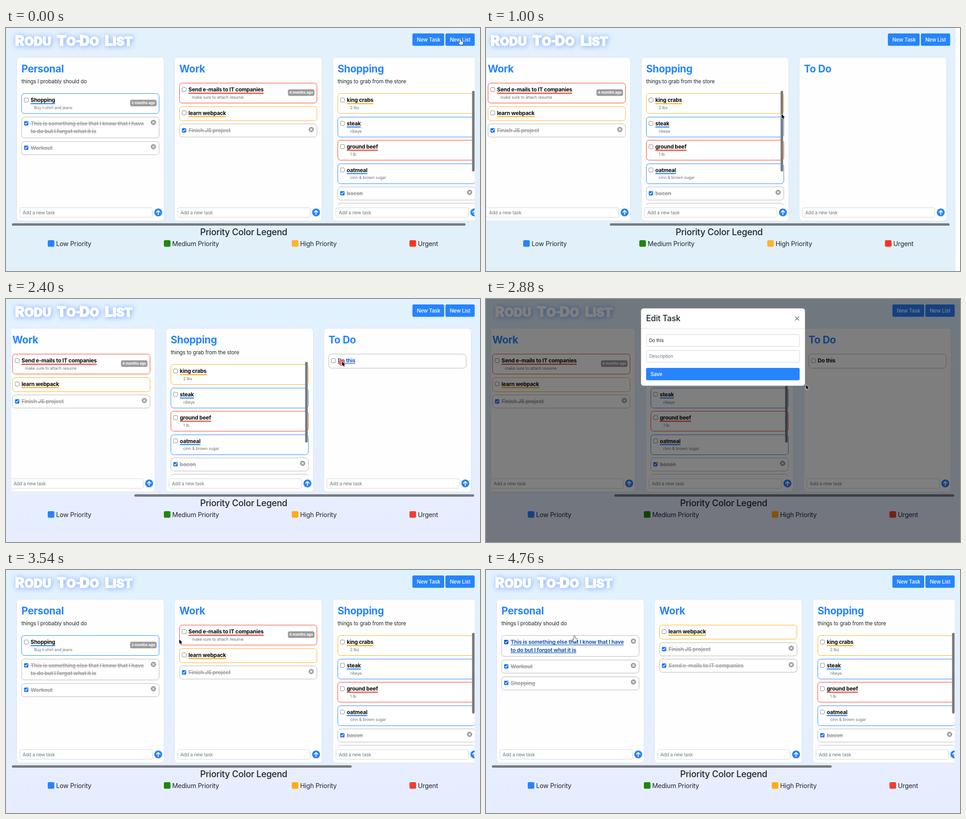
Write an HTML page with a canvas that moves like this. It is 1045 px wide and 536 px high and loops after 4.78 s.

```html
<!DOCTYPE html>
<html lang="en">
<head>
<meta charset="utf-8">
<title>To-do board</title>
<style>
html, body { margin: 0; width: 100%; height: 100%; overflow: hidden; background: #fff; }
canvas { display: block; }
</style>
</head>
<body>
<canvas id="stage" width="1045" height="536"></canvas>
<script>
const ctx = document.getElementById('stage').getContext('2d');
const LOOP = 4780, STEP = 20, W = 1045, H = 536;
const LIST_ADDED = 660, TASK_ADDED = 1760, RECOLOR = 2180, WORK_DONE = 3900, PERSONAL_DONE = 4450;
const BLUE = '#2684ff', LINK = '#1a5cb8', GRAY = '#a3a3a3', INK = '#212529';

// [time, value...] keys
const cursorKeys = [
  [0, 1002, 25], [80, 1002, 25], [230, 480, 91], [420, 480, 91], [560, 461, 164], [650, 461, 164],
  [720, 509, 178], [1000, 652, 190], [1080, 740, 405], [1480, 760, 420], [1640, 1000, 410],
  [1690, 1013, 405], [1780, 1013, 405], [2010, 655, 200], [2340, 741, 138],
  [2460, 741, 138], [3180, 684, 220], [3280, 674, 212], [3540, 382, 153],
  [3740, 393, 136], [3900, 393, 136], [4310, 62, 159], [4380, 45, 158],
  [4470, 45, 158], [4740, 195, 146]];
const scrollKeys = [[760, 0], [950, 368], [3264, 368], [3470, 0]];
const shiftKeys = [[920, 0], [970, -10], [1010, -10], [1070, 0], [3450, 0], [3490, 8], [3540, 0]];
const clicks = [[620, 461, 166], [1690, 1013, 407], [2340, 740, 140], [3840, 393, 136], [4390, 45, 159]];
const handTimes = [[0, 180], [540, 660], [1670, 1800], [4620, LOOP]];
const dialogs = [
  { keys: [[60, 0], [120, 1], [600, 1], [650, 0]], heading: 'New List', value: 'To Do', typeAt: 240, action: 'Add List' },
  { keys: [[2430, 0], [2490, 1], [3150, 1], [3210, 0]], heading: 'Edit Task', value: 'Do this', typeAt: 0, action: 'Save' }];

const within = (t, a, b) => t >= a && t < b;
const typing = (str, t, start) => str.slice(0, Math.max(0, Math.floor((t - start) / 60)));

function sample(keys, t) {
  const next = keys.findIndex(k => k[0] > t);
  if (next < 0) return keys[keys.length - 1].slice(1);
  if (next === 0) return keys[0].slice(1);
  const a = keys[next - 1], b = keys[next];
  const p = (t - a[0]) / (b[0] - a[0]), e = p * p * (3 - 2 * p);
  return a.slice(1).map((v, i) => v + (b[i + 1] - v) * e);
}

function text(str, x, y, size, color, weight = 400) {
  ctx.font = `${weight} ${size}px Inter, sans-serif`;
  ctx.letterSpacing = `${-0.015 * size}px`;
  ctx.fillStyle = color;
  ctx.fillText(str, x, y);
  return ctx.measureText(str).width;
}

function box(x, y, w, h, r, fill, stroke) {
  ctx.beginPath();
  ctx.roundRect(x, y, w, h, r);
  if (fill) { ctx.fillStyle = fill; ctx.fill(); }
  if (stroke) { ctx.strokeStyle = stroke; ctx.lineWidth = 1; ctx.stroke(); }
}

function disc(x, y, r, fill) {
  ctx.beginPath();
  ctx.arc(x, y, r, 0, 7);
  ctx.fillStyle = fill;
  ctx.fill();
}

function strokes(d, x, y, color, width) {
  ctx.save();
  ctx.translate(x, y);
  ctx.strokeStyle = color;
  ctx.lineWidth = width;
  ctx.lineCap = ctx.lineJoin = 'round';
  ctx.stroke(new Path2D(d));
  ctx.restore();
}

function input(x, y, w, h, value, hint) {
  box(x, y, w, h, 3, '#fff', '#cfd4da');
  text(value || hint, x + 6.2, y + h / 2 + 3.7, 10.1, value ? INK : '#6c757d');
}

const todo = (label, color, desc, age) => ({ lines: [label], color, desc, age });
const done = (...lines) => ({ lines, done: true });

function boards(t) {
  const late = t >= RECOLOR;
  const orange = late ? '#ffac12' : '#ffb327', red = late ? '#ee402d' : '#f8371d';
  const errand = todo('Shopping', BLUE, 'Buy t-shirt and jeans', '3 months ago');
  const long = done('This is something else that I know that I have', 'to do but I forgot what it is');
  long.hover = t >= 4660;
  const mail = todo('Send e-mails to IT companies', red, 'make sure to attach resume', '4 months ago');
  const learn = todo('learn webpack', orange);
  const project = done('Finish JS project');
  const thing = { ...todo('Do this'), hover: within(t, 2290, 2500) };
  const typed = t < TASK_ADDED ? typing('Do this', t, 1100) : '';

  const all = [
    { name: 'Personal', note: 'things I probably should do',
      tasks: t < PERSONAL_DONE ? [errand, long, done('Workout')] : [long, done('Workout'), done('Shopping')] },
    { name: 'Work',
      tasks: t < WORK_DONE ? [mail, learn, project] : [learn, project, done('Send e-mails to IT companies')] },
    { name: 'Shopping', note: 'things to grab from the store', bar: true,
      tasks: [todo('king crabs', orange, '2 lbs'), todo('steak', BLUE, 'ribeye'), todo('ground beef', red, '1 lb'),
        todo('oatmeal', BLUE, 'cinn & brown sugar'), done('bacon'), done('milk')] },
    { name: 'To Do', tasks: t < TASK_ADDED ? [] : [thing], typed }];
  return { lists: t < LIST_ADDED ? all.slice(0, 3) : all, orange, red };
}

function drawTask(task, x, y) {
  const h = task.done ? 28.5 + 17.3 * (task.lines.length - 1) : task.desc ? 43.5 : 30.7;
  box(x + .5, Math.floor(y) + .5, 303, Math.round(h), 6, '#fff', task.color || '#b6b6bb');

  if (task.done) {
    box(x + 5.8, y + 9.2, 9.6, 9.6, 2, task.hover ? '#1559b5' : '#1a76e8');
    strokes('M-2.6 0L-.8 2L2.6-2.4', x + 10.6, y + 14, '#fff', 1.4);
    disc(x + 291, y + 12, 5.7, '#999');
    strokes('M-2-2L2 2M2-2L-2 2', x + 291, y + 12, '#fff', 1.5);
  } else {
    box(x + 6.2, y + 9.5, 9, 9, 2, '#fff', '#808080');
  }

  task.lines.forEach((line, i) => {
    const base = y + 18.5 + i * 17.3;
    const color = task.hover ? LINK : task.done ? GRAY : '#080808';
    const width = text(line, x + 20.3, base, 11.85, color, 700);
    if (task.hover) box(x + 20.3, base + 1.4, width, 1.2, 0, LINK);
    else if (task.done) box(x + 20.3, base - 4.5, width, 1.3, 0, GRAY);
    else if (task.color) box(x + 20.3, base + 2.4, width, 2.2, 0, task.color);
  });

  if (task.desc) text(task.desc, x + 27.8, y + 34.2, 8.95, '#6d7278');
  if (task.age) {
    box(x + 239.5, y + 13.3, 58.5, 14.5, 4, '#9b9b9b');
    text(task.age, x + 242.6, y + 23.5, 8.05, '#fff', 700);
  }
  return y + h + 7.9;
}

function drawList(list, x) {
  box(x + .5, 64.5, 325, 361, 7, '#fefefe', '#dce3e8');
  text(list.name, x + 11, 97.5, 22.4, BLUE, 700);
  if (list.note) text(list.note, x + 11, 121.5, 11.6, INK);

  ctx.save();
  ctx.beginPath();
  ctx.rect(x, 115, 326, 275.5);
  ctx.clip();
  let y = list.note ? 144.9 : 121.9;
  for (const task of list.tasks) y = drawTask(task, x + 11, y);
  if (list.bar) box(x + 307.5, 138.5, 5.6, 178, 2.8, '#777b7e');
  ctx.restore();

  input(x + 7.5, 396.5, 292, 21, list.typed, 'Add a new task');
  disc(x + 312.6, 406.8, 8.8, BLUE);
  strokes('M0 4.5V-4M-3.8-.4L0-4.2L3.8-.4', x + 312.6, 406.8, '#fff', 2);
}

function drawTitle() {
  const words = [['R', 'ODU', 20], ['T', 'O-', 112], ['D', 'O', 162], ['L', 'IST', 218]];
  ctx.save();
  ctx.letterSpacing = '0px';
  ctx.lineJoin = 'round';
  ctx.lineWidth = 1.2;
  const glyphs = (str, x, size) => {
    ctx.font = `900 ${size}px Inter, sans-serif`;
    ctx.strokeText(str, x, 38.5);
    ctx.fillText(str, x, 38.5);
    return ctx.measureText(str).width;
  };
  ctx.fillStyle = ctx.strokeStyle = '#fff';
  for (const [blur, color] of [[11, 'rgba(90,140,255,.7)'], [0, 'transparent']]) {
    ctx.shadowBlur = blur;
    ctx.shadowColor = color;
    ctx.shadowOffsetX = ctx.shadowOffsetY = 1.5;
    for (const [cap, rest, x] of words) glyphs(rest, x + glyphs(cap, x, 31), 26.5);
  }
  ctx.restore();
}

function drawButton(label, x, y, w) {
  box(x, y, w, 27.3, 3, BLUE);
  text(label, x + 9.7, y + 18, 11.4, '#fff', 500);
}

function drawDialog({ keys, heading, value, typeAt, action }, t) {
  const [open] = sample(keys, t);
  if (!open) return;
  ctx.save();
  ctx.globalAlpha = open;
  ctx.fillStyle = 'rgba(0,0,0,.5)';
  ctx.fillRect(0, 0, W, H);
  ctx.translate(0, (open - 1) * 36);
  box(341.5, 20.5, 362, 171, 6, '#fff', '#999');
  box(342, 65, 361, 1, 0, '#dee2e6');
  text(heading, 353, 49, 18, INK, 500);
  strokes('M-4-4L4 4M4-4L-4 4', 686, 43, '#777', 1.6);
  input(353.5, 78.5, 338, 26, typing(value, t, typeAt), 'Title');
  input(353.5, 113.5, 338, 26, '', 'Description');
  drawButton(action, 353, 152, 338.5);
  ctx.restore();
}

function drawCursor(x, y, hand) {
  const arrow = 'M0 0V9.6L2.2 7.6L3.8 11.2L5.4 10.5L3.9 7H6.8Z';
  const finger = 'M-1.2 .6Q0-1 1.2 .6V4.4L5.2 5.4Q6.2 6 5.8 7.2L4.8 12H-1.4L-4.6 7.8Q-3.8 6-1.2 7.8Z';
  const shape = new Path2D(hand ? finger : arrow);
  ctx.save();
  ctx.translate(x, y);
  ctx.lineJoin = 'round';
  ctx.lineWidth = 1.4;
  ctx.strokeStyle = hand ? '#222' : '#fff';
  ctx.fillStyle = hand ? '#fff' : '#000';
  ctx.stroke(shape);
  ctx.fill(shape);
  ctx.restore();
}

function draw(t) {
  const { lists, orange, red } = boards(t);
  const [scroll] = sample(scrollKeys, t), [shift] = sample(shiftKeys, t);
  ctx.fillStyle = '#fff';
  ctx.fillRect(0, 0, W, H);

  ctx.save();
  ctx.translate(shift, 0);
  const sky = ctx.createLinearGradient(0, 0, 0, H);
  const [top, bottom] = t < RECOLOR ? ['#e3f1fd', '#e1f0f9'] : ['#e1f2ff', '#e7edff'];
  sky.addColorStop(0, top);
  sky.addColorStop(1, bottom);
  ctx.fillStyle = sky;
  ctx.fillRect(0, 0, W, H);

  drawTitle();
  drawButton('New Task', 896, 12, 70);
  drawButton('New List', 968.7, 12, 64.6);

  ctx.save();
  ctx.beginPath();
  ctx.rect(11.7, 60, 1021.6, 368);
  ctx.clip();
  lists.forEach((list, i) => drawList(list, Math.floor(23.2 + i * 348.5 - scroll)));
  ctx.restore();

  box(13 + scroll * 270 / 368, 430.8, lists.length < 4 ? 1000 : 749, 5.2, 2.6, '#767b7f');
  text('Priority Color Legend', 428, 457, 19.5, INK, 500);
  const legend = [['Low Priority', 92, BLUE], ['Medium Priority', 348, '#23860b'],
    ['High Priority', 630, orange], ['Urgent', 889.5, red]];
  for (const [label, x, color] of legend) {
    box(x, 468, 14.6, 14.4, 3, color);
    text(label, x + 18.5, 480.8, 14.2, INK);
  }
  ctx.restore();

  for (const dialog of dialogs) drawDialog(dialog, t);
  for (const [start, x, y] of clicks)
    if (within(t, start, start + 150)) disc(x, y, 7.3, 'rgba(250,80,65,.68)');
  drawCursor(...sample(cursorKeys, t), handTimes.some(([a, b]) => within(t, a, b)));
}

function tick() {
  const t = performance.now() + 1;
  draw(Math.floor(t / STEP) * STEP % LOOP);
  requestAnimationFrame(tick);
}
tick();
</script>
</body>
</html>
```
